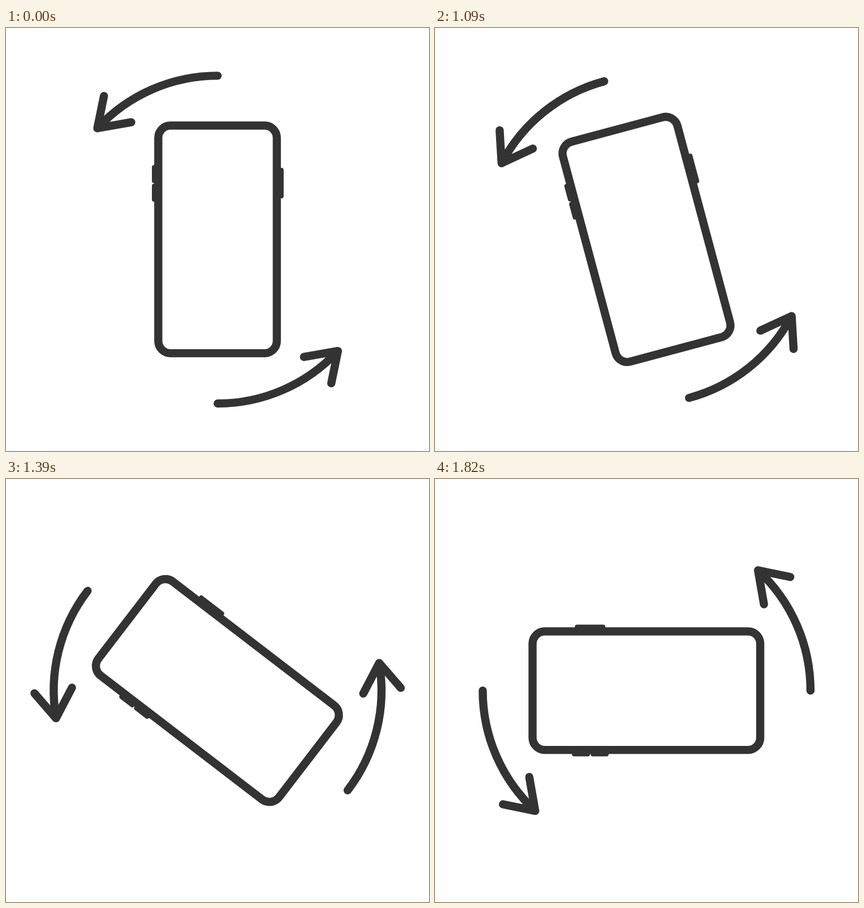
These frames come from a looping animation (748 by 748 pixels, 2.69 s). An HTML page with a canvas:

```html
<!DOCTYPE html>
<html lang="en">
<head>
<meta charset="utf-8">
<title>Rotate your phone</title>
<style>
  html, body { margin: 0; width: 100%; height: 100%; overflow: hidden; background: #fff; }
  canvas { display: block; width: 100%; height: 100%; }
</style>
</head>
<body>
<canvas id="stage" width="748" height="748"></canvas>
<script>
const ctx = document.getElementById('stage').getContext('2d');
const SIZE = 748, CENTER = 374.2, INK = '#333';
const LOOP = 2690, START = 1000, STEP = 30, STEPS = 24;
const RADIUS = 289.8;
const TIP = [-212.7, -197];

function roundRect(x, y, w, h, r) {
  ctx.beginPath();
  ctx.roundRect(x, y, w, h, r);
}

function drawPhone() {
  roundRect(-104.9, -201.7, 209.6, 402.6, 21.6);
  ctx.stroke();
  // volume keys on the left, power key on the right
  roundRect(-116.2, -132, 12, 32, 4);
  ctx.fill();
  roundRect(-116.2, -99, 12, 32, 4);
  ctx.fill();
  roundRect(104.8, -127, 12, 54, 4);
  ctx.fill();
}

function drawArrow() {
  ctx.beginPath();
  ctx.arc(0, 0, RADIUS, -Math.PI / 2, Math.atan2(TIP[1], TIP[0]), true);
  ctx.moveTo(-201, -254);
  ctx.lineTo(...TIP);
  ctx.lineTo(-152.7, -207.5);
  ctx.stroke();
}

// The quarter turn advances in even steps, then rests.
function turnAt(time) {
  const n = Math.floor((time - START) / STEP) + 1;
  return Math.min(Math.max(n, 0), STEPS) / STEPS * Math.PI / 2;
}

function draw(time) {
  ctx.fillStyle = '#fff';
  ctx.fillRect(0, 0, SIZE, SIZE);
  ctx.save();
  ctx.translate(CENTER, CENTER);
  ctx.rotate(-turnAt(time));
  ctx.fillStyle = ctx.strokeStyle = INK;
  ctx.lineWidth = 14.4;
  ctx.lineCap = ctx.lineJoin = 'round';
  drawPhone();
  drawArrow();
  ctx.rotate(Math.PI);
  drawArrow();
  ctx.restore();
}

const began = performance.now();
function tick() {
  draw((performance.now() - began) % LOOP);
  requestAnimationFrame(tick);
}
tick();
</script>
</body>
</html>
```
